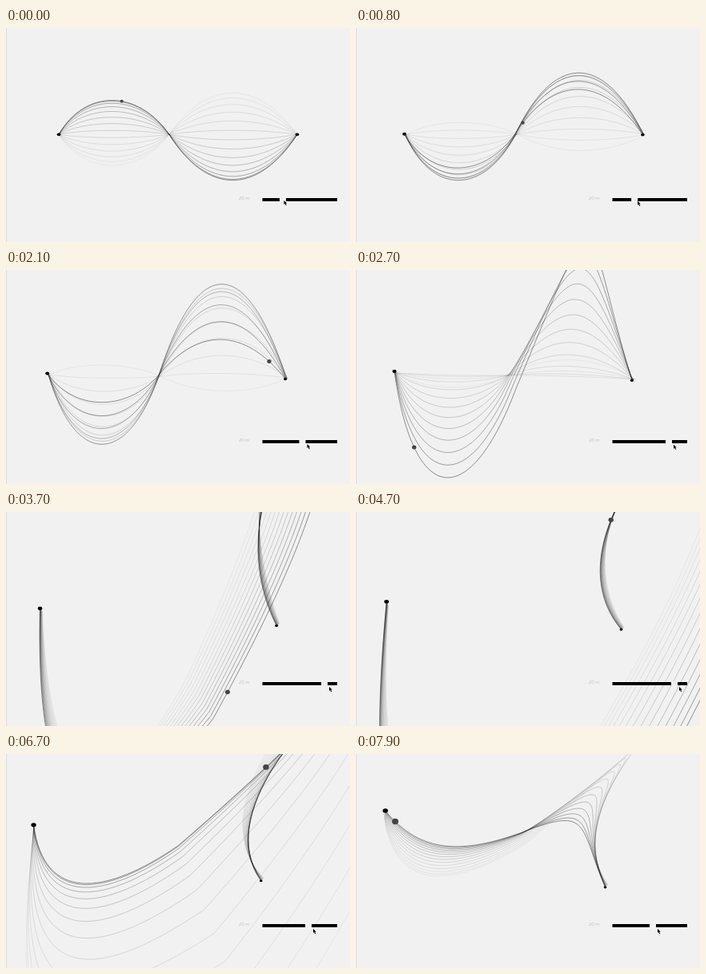
These frames come from a looping animation (430x268 px, 8000 ms). An HTML page with a canvas:

```html
<!DOCTYPE html>
<html lang="en">
<head>
<meta charset="utf-8">
<title>Swinging curve</title>
<style>
  html, body { margin: 0; width: 100%; height: 100%; overflow: hidden; background: #f1f1f1; }
  canvas { display: block; width: 430px; height: 268px; }
</style>
</head>
<body>
<canvas id="stage" width="430" height="268"></canvas>
<script>
const ctx = document.getElementById('stage').getContext('2d');
const LOOP = 8000, STEP = 100;
const PAPER = '#f1f1f1';
const FOCAL = 228, HALF = 149, CX = 215, CY = 133.3;
const TRAIL = 14, TRAIL_GAP = 0.042;

// Inner points of two joined cubics. Flat pose: place on the rod and lift.
// Tilted pose: rest offset from an anchor, pull per unit of swing, share of the surge.
const joints = [
  { at: 0.11, lift: 57, anchor: 'left', rest: [44, 56], pull: [-26, 24], surge: [0, 1] },
  { at: 0.33, lift: 57, anchor: 'left', rest: [98, 54], pull: [-8, 20], surge: [0, 1] },
  { at: 0.463, lift: 0, anchor: 'middle', rest: [34, -21], pull: [0, 0], surge: [0.4, 1] },
  { at: 0.62, lift: -75, anchor: 'right', rest: [-12, -108], pull: [170, -160], surge: [0, 0] },
  { at: 0.83, lift: -78, anchor: 'right', rest: [-34, -78], pull: [-40, -30], surge: [0, 0] }
];

// Swells of the swing: start, end, change.
const swells = [[2.2, 2.9, 3.4], [4.2, 4.8, 0.3], [5.2, 5.5, -1.2], [5.5, 5.9, 1.2],
  [6, 6.7, -2.5], [7.3, 7.95, -1.25]];

// Key points as [seconds, value].
const knobPath = [[0, 342], [1.5, 346], [2.7, 387], [3, 394], [5.9, 394], [6.7, 374], [7.2, 367]];
const beadPath = [[0, 0.29], [1.5, 0.75], [2.7, 1.12], [4.7, 1.9], [6.7, 2.59], [7.9, 3.045]];

const clamp = k => Math.min(1, Math.max(0, k));
const mix = (a, b, k) => a + (b - a) * k;
const mixPoint = (p, q, k) => ({ x: mix(p.x, q.x, k), y: mix(p.y, q.y, k) });
const ramp = (t, from, to) => (1 - Math.cos(Math.PI * clamp((t - from) / (to - from)))) / 2;

function track(keys, t) {
  let i = 0;
  while (i < keys.length - 2 && t > keys[i + 1][0]) i++;
  const [t0, a] = keys[i], [t1, b] = keys[i + 1];
  return mix(a, b, clamp((t - t0) / (t1 - t0)));
}

function swingAt(t) {
  const wobble = -Math.cos(2 * Math.PI * t / 1.27) * (1 + 0.55 * Math.max(0, t));
  return swells.reduce((sum, [from, to, change]) => sum + change * ramp(t, from, to),
    wobble * (1 - ramp(t, 1.9, 2.4)));
}

// End points of a rod turning about the x and y axes, seen in perspective.
function rodEnd(side, t) {
  const turn = 0.0725 * Math.max(0, t), s = Math.sin(turn), c = Math.cos(turn);
  const scale = FOCAL / (FOCAL + side * HALF * s * c);
  return {
    x: CX + side * HALF * c * scale,
    y: CY + side * HALF * s * s * scale,
    scale
  };
}

function curveAt(t) {
  const swing = swingAt(t), tilt = ramp(t, 1.8, 5.5), surge = 6.8 * swing ** 3;
  const left = rodEnd(-1, t), right = rodEnd(1, t);
  const anchors = { left, right, middle: mixPoint(left, right, 0.5) };
  const inner = joints.map(j => {
    const flat = mixPoint(left, right, j.at);
    flat.y += j.lift * swing;
    const [dx, dy] = j.rest.map((r, i) => r + j.pull[i] * swing + j.surge[i] * surge);
    const base = anchors[j.anchor];
    return mixPoint(flat, { x: base.x + dx, y: base.y + dy }, tilt);
  });
  return [left, ...inner, right];
}

function pointOn(curve, s) {
  const start = s < 0.5 ? 0 : 3, u = s * 2 - (start ? 1 : 0), v = 1 - u;
  const weights = [v * v * v, 3 * v * v * u, 3 * v * u * u, u * u * u];
  const sum = axis => weights.reduce((n, w, i) => n + w * curve[start + i][axis], 0);
  return { x: sum('x'), y: sum('y') };
}

function strokeCurve(p, alpha) {
  ctx.strokeStyle = `rgba(20,20,20,${alpha})`;
  ctx.lineWidth = 0.7;
  ctx.beginPath();
  ctx.moveTo(p[0].x, p[0].y);
  for (const i of [1, 4]) {
    ctx.bezierCurveTo(p[i].x, p[i].y, p[i + 1].x, p[i + 1].y, p[i + 2].x, p[i + 2].y);
  }
  ctx.stroke();
}

function spot(p, rx, ry, color) {
  ctx.fillStyle = color;
  ctx.beginPath();
  ctx.ellipse(p.x, p.y, rx, ry, 0, 0, Math.PI * 2);
  ctx.fill();
}

function drawSlider(knob) {
  ctx.fillStyle = '#c4c4c4';
  ctx.font = 'italic 6px "Liberation Sans", Arial, sans-serif';
  ctx.fillText('20 m', 291, 215);
  ctx.fillStyle = '#000';
  ctx.fillRect(320.5, 213, 93.5, 4);
  ctx.fillStyle = PAPER;
  ctx.fillRect(knob, 212, 8, 6);
}

function drawPointer(x, y) {
  ctx.save();
  ctx.translate(x, y);
  ctx.fillStyle = '#000';
  ctx.fill(new Path2D('M0 0 L0 5 L1.2 4 L2.2 6.3 L3.2 5.8 L2.2 3.7 L3.6 3.5 Z'));
  ctx.restore();
}

function draw(t) {
  ctx.fillStyle = PAPER;
  ctx.fillRect(0, 0, 430, 268);
  ctx.fillStyle = '#dcdcdc';
  ctx.fillRect(0, 0, 1, 268);

  for (let i = TRAIL - 1; i >= 0; i--) {
    strokeCurve(curveAt(t - i * TRAIL_GAP), 0.65 * 0.85 ** i);
  }
  const curve = curveAt(t);
  for (const end of [curve[0], curve[6]]) {
    spot(end, 2.3 * end.scale, 1.9 * end.scale, '#000');
  }
  const size = 2.1 + 0.24 * t;
  spot(pointOn(curve, track(beadPath, t) % 1), size, size * 0.92, '#444');

  const knob = track(knobPath, t);
  drawSlider(knob);
  drawPointer(knob + Math.min(10, 5.5 + 3 * t), 216 + Math.min(3, t));
}

function tick() {
  const now = performance.now() % LOOP;
  draw(Math.floor(now / STEP) * STEP / 1000);
  requestAnimationFrame(tick);
}
tick();
</script>
</body>
</html>
```
